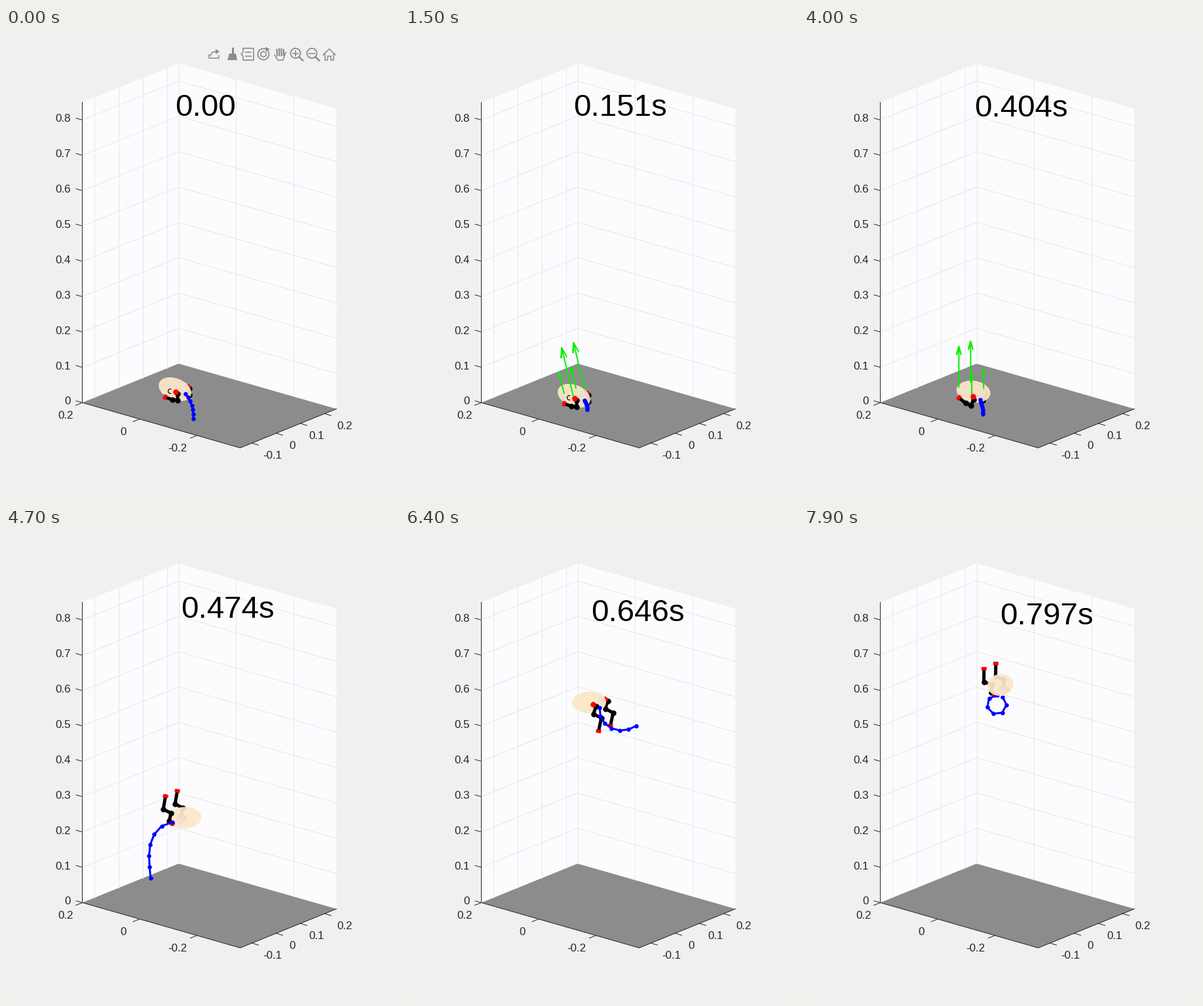
Write a matplotlib script that moves like this. It is 600 px wide and 720 px high and loops after 8 s.

```python
import numpy as np
import matplotlib.pyplot as plt
from matplotlib.animation import FuncAnimation
from matplotlib.patches import Circle, Ellipse, Polygon

FRAMES, DT = 80, 0.01009
PX = 0.72  # points per pixel at 100 dpi
FONT = "Liberation Sans"
INK, ICON, GRID = "#262626", "#8c8c8c", "#e4e4ea"

fig = plt.figure(figsize=(6, 7.2), dpi=100, facecolor="#f0f0f0")
ax = fig.add_axes([0, 0, 1, 1])
ax.set(xlim=(0, 600), ylim=(720, 0))
ax.axis("off")


def line(xs, ys, color, width=1, z=1, **kw):
    return ax.plot(xs, ys, color=color, lw=width * PX, zorder=z, **kw)[0]


def label(x, y, value, ha="center"):
    ax.text(x, y + 6, f"{value:g}", ha=ha, va="baseline", fontsize=17 * PX,
            family=FONT, color=INK)


# ---- box, grid and ticks ----
LEFT, BACK = np.array([116.5, 571.5]), np.array([263.5, 512])
RIGHT, FRONT = np.array([504.5, 581]), np.array([357.5, 640.5])
UP = np.array([0, -458])
STEP = 53.9  # pixels per 0.1 of height


def on_edge(a, b, x):
    return a[1] + (b[1] - a[1]) * (x - a[0]) / (b[0] - a[0])


def draw_box():
    for a, b in ((LEFT, BACK), (BACK, RIGHT)):
        ax.add_patch(Polygon([a, b, b + UP, a + UP], fc="#fcfcff", ec="none", zorder=0))
    ax.add_patch(Polygon([LEFT, BACK, RIGHT, FRONT], fc="#8c8c8c", ec="none", zorder=0.5))
    line(*np.transpose([LEFT + UP, LEFT, FRONT, RIGHT]), INK)

    for i in range(9):
        rise = np.array([0, -i * STEP])
        if i:
            line(*np.transpose([LEFT + rise, BACK + rise, RIGHT + rise]), GRID, 0.9)
        x, y = LEFT + rise
        line([x - 9.5, x], [y - 2.7, y], INK)
        label(98.5, y - 3, i / 10, "right")

    for i in range(4):
        x = 134.5 + 37 * i
        y = on_edge(LEFT, BACK, x)
        line([x, x], [y, y - 458], GRID, 0.9)
        x = 375.5 + 37 * i
        y = on_edge(FRONT, RIGHT, x)
        line([x, x + 10], [y, y + 3], INK)
        label(x + (31 if i % 3 == 0 else 25), 651 - 15 * i, (i - 1) / 10)

    for i in range(3):
        x = BACK[0] + 87.5 * i
        y = on_edge(BACK, RIGHT, x)
        line([x, x], [y, y - 458], GRID, 0.9)
        x = LEFT[0] + 87.5 * i
        y = on_edge(LEFT, FRONT, x)
        line([x, x - 10], [y, y + 4], INK)
        label(x - (30 if i == 2 else 25), 590 + 25 * i, 0.2 - 0.2 * i)


# ---- toolbar, shown only at the start ----
def draw_toolbar():
    parts = []

    def stroke(*pts, w=1.6):
        parts.append(line(*zip(*pts), ICON, w, 9))

    def fill(*pts):
        parts.append(ax.add_patch(Polygon(pts, fc=ICON, ec="none", zorder=9)))

    def ring(x, y, r):
        parts.append(ax.add_patch(Circle((x, y), r, fill=False, ec=ICON, lw=1.3, zorder=9)))

    # export
    stroke((310, 41), (310, 46), (325, 46), (325, 42))
    stroke((312, 42), (315, 37), (322, 36))
    fill((320, 32), (326, 36), (320, 40))
    # brush
    stroke((346, 31), (346, 38), w=3)
    fill((341, 39), (351, 39), (353, 49), (338, 49))
    # data tip
    stroke((362, 31), (378, 31), (378, 49), (362, 49), (362, 43), (359, 40), (362, 37), (362, 31))
    for y in (37, 43):
        stroke((366, y), (374, y))
    # rotate
    ring(393, 40, 8.5)
    a = np.radians(np.arange(30, 391, 60))
    stroke(*zip(393 + 4.5 * np.cos(a), 40 + 4.5 * np.sin(a)))
    fill((396, 29), (403, 32), (397, 36))
    # pan
    stroke((410, 41), (415, 49), (423, 49), (427, 37))
    for i in range(4):
        x = 413.5 + 3.4 * i
        stroke((x, 33 - (i % 3 > 0)), (x + 0.5, 42), w=2.2)
    # zoom in, zoom out
    for x in (442, 467):
        ring(x, 38.5, 7.5)
        stroke((x + 5.5, 44), (x + 11, 49.5), w=2.6)
        stroke((x - 4, 38.5), (x + 4, 38.5))
    stroke((442, 34.5), (442, 42.5))
    # home
    stroke((484, 41), (493.5, 32), (503, 41))
    stroke((487, 40), (487, 49), (491, 49), (491, 43), (496, 43), (496, 49), (500, 49), (500, 40))
    return parts


# ---- motion: crouch until the first key, then four marks in the air ----
KEYS = [38, 47, 57, 64, 79]
SPINE = [207, 103, -34, -79, -248]      # direction from hand to foot
HAND = [284, 202, 108, -23, -123]       # hand seen from the body centre
HAND_R = [4, 21, 13, 7, 17]
SWAY = [0, 10.5 - 3j, 4 + 5j, 0, 2 + 2j]  # body against centre of mass

TAIL_KEYS = [38, 47, 57, 64, 72, 79]
TAIL_BASE = [308, 200, 30, -85, -95, -65]
TAIL_CURL = [-40, 155, 0, 130, 10, -270]
TAIL_BEND = [0, -80, 195, -20, 0, 0]
TAIL_STEP = [0, 17, 15.5, 13, 17, 13.5]

# hand, elbow, back, hip, foot along the spine direction
FOLDED = np.array([0, -0.07 - 0.22j, 0.17 - 0.72j, 0.55 - 0.47j, 1])
OPEN = np.array([0, 0.09 - 0.08j, 0.35 + 0.06j, 0.55 - 0.19j, 1])
ACROSS = 18 - 8j  # from the near side to the far side


def ease(x):
    x = np.clip(x, 0, 1)
    return x * x * (3 - 2 * x)


def toward(degrees):
    """Unit step on screen, as x + iy with y down."""
    return np.exp(-1j * np.radians(degrees))


def xy(z):
    z = np.atleast_1d(z)
    return z.real, z.imag


def drift(k):
    """Centre of mass: drop, crouch, push-off, free flight."""
    if k < 41:
        push = max(0, (k - 38.5) / 2.5)
        drop = max(0, 10 - 0.269 * k * k)
        return 258 - 2.7 * push + 1j * (561 - drop - 15.7 * push**2)
    n = k - 47
    return 262 + 1.12 * n + 1j * (445 - 15.1 * n + 0.269 * n * n)


def limb_at(k, centre):
    open_ = ease((k - 38) / 8)
    shape = FOLDED + (OPEN - FOLDED) * open_
    hand = centre + np.interp(k, KEYS, HAND_R) * toward(np.interp(k, KEYS, HAND))
    return hand + shape * (18 + 24 * open_) * toward(np.interp(k, KEYS, SPINE))


def tail_at(k, middle):
    base, curl, bend, step = (np.interp(k, TAIL_KEYS, t)
                              for t in (TAIL_BASE, TAIL_CURL, TAIL_BEND, TAIL_STEP))
    step = max(step, 2.5 + 4.3 * np.exp(-(k / 7) ** 2))
    u = np.linspace(0, 1, 6)
    joints = np.cumsum(step * toward(base + curl * u + bend * u * u))
    return middle + 9 * toward(base) + np.append(0, joints)


# ---- moving artists ----
class Limb:
    def __init__(self):
        self.bone = line([], [], "black", 5, marker="o", ms=8.5 * PX, mew=0,
                         markevery=[1, 2, 3])
        self.hand = line([], [], "red", 1, marker="o", ms=8.5 * PX, mew=0)
        self.foot = line([], [], "red", 5, solid_capstyle="butt")

    def pose(self, p, z):
        shin = p[4] - p[3]
        side = 4j * shin / abs(shin)
        self.bone.set_data(*xy(p))
        self.hand.set_data(*xy(p[0]))
        self.foot.set_data(*xy([p[4] - side, p[4] + side]))
        self.bone.set_zorder(z)
        self.hand.set_zorder(z + 0.1)
        self.foot.set_zorder(z + 0.1)


draw_box()
toolbar = draw_toolbar()
body = ax.add_patch(Ellipse((0, 0), 1, 1, fc="#fde8c8", ec="none", alpha=0.93, zorder=4))
head = ax.add_patch(Ellipse((0, 0), 12, 17, fc="#eedfd0", ec="none", alpha=0.75, zorder=4.5))
near, far = Limb(), Limb()
mark = line([], [], "black", 1.2, 4.6)
tail = line([], [], "blue", 3, 6, marker="o", ms=6.5 * PX, mew=0)
arrows = [line([], [], "#00f000", 2, 4.2) for _ in range(4)]
timer = ax.text(0, 0, "", fontsize=47.5 * PX, family=FONT, color="black", zorder=8)


def draw_forces(k, near_p, far_p):
    """Load moves from the hands to the feet during the crouch."""
    load = 1 - ease((k - 15) / 13)
    lean = -0.24 * load - 0.9 * np.exp(1 - k)
    hands, feet = 30 + 44 * load, 62 - 30 * load
    starts = [(p[i] + lift, size) for p in (near_p, far_p)
              for i, lift, size in ((0, -2 - 3j, hands), (4, -16j, feet))]
    for art, (start, size) in zip(arrows, starts):
        force = size * (lean - 1j)
        tip = start + force
        barbs = [tip - force * (0.19 + s * 0.055j) for s in (1, -1)]
        art.set_data(*xy([start, tip, barbs[0], tip, barbs[1]]))
        art.set_visible(1 <= k <= 40)


def update(k):
    for part in toolbar:
        part.set_visible(k == 0)

    timer.set_text("0.00" if k == 0 else f"{k * DT:.3g}s")
    slide = max(0, k - 36.5) + (k == 0)
    timer.set_position((257 + slide, 134 + 0.3 * slide))

    centre = drift(k) + np.interp(k, KEYS, SWAY)
    near_p = limb_at(k, centre)
    far_p = near_p + ACROSS
    behind = k >= 70
    near.pose(near_p, 3 if behind else 5)
    far.pose(far_p, 2.5)

    air = ease((k - 38) / 9)
    tilt = -22 * (1 - air) + (np.interp(k, KEYS, SPINE) - 100) * air
    length = 52 - 12 * ease((k - 64) / 15)
    body.set(center=(centre.real, centre.imag), width=length, height=33, angle=-tilt)
    face = near_p[0] + 0.7 * ACROSS
    head.set(center=(face.real, face.imag), angle=-tilt)

    tail.set_data(*xy(tail_at(k, near_p[0] + ACROSS / 2)))
    tail.set_zorder(3.5 if behind else 6)

    arc = toward(np.linspace(80, 280, 9))
    mark.set_data(*xy(centre - 7 + 3j + 3.5 * arc))
    mark.set_visible(k < 39)
    draw_forces(k, near_p, far_p)
    return []


anim = FuncAnimation(fig, update, frames=FRAMES, interval=100, repeat=True, repeat_delay=0)
plt.show()
```
